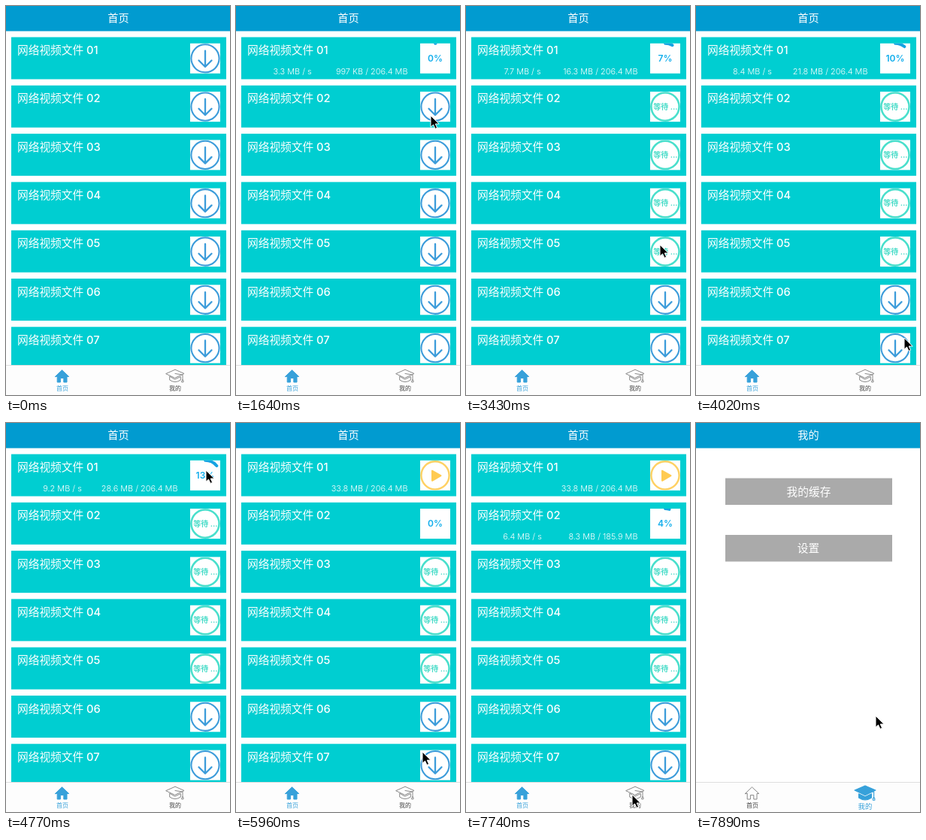
An HTML page that plays this animation: 298 by 518 pixels, repeating every 8 s.

```html
<!DOCTYPE html>
<html lang="zh-CN">
<head>
<meta charset="utf-8">
<title>首页</title>
<style>
  html, body { margin: 0; width: 100%; height: 100%; overflow: hidden; background: #fff; }
  #stage { display: block; width: 298px; height: 518px; }
  text { font-family: Inter, "Noto Sans CJK SC", "Noto Sans CJK", sans-serif; }
  .mid { text-anchor: middle; }
  .title { font-size: 14.7px; fill: #fff; }
  .head { font-size: 14.2px; font-weight: 500; fill: #fff; }
  .info { font-size: 10.9px; font-weight: 300; fill: #fff; }
  .wait { font-size: 10px; font-weight: 700; fill: #48dcc8; }
  .pct { font-size: 12px; font-weight: 600; fill: #12aeec; }
  .tab { font-size: 8px; fill: #444; }
  .line { fill: none; stroke-linecap: round; stroke-linejoin: round; }
  .on { color: #37a1da; }
  .on text { fill: #37a1da; }
  .off { color: #888; }
</style>
</head>
<body>
<svg id="stage" viewBox="0 0 298 518">
  <rect width="298" height="518" fill="#fff"/>
  <g id="list"></g>
  <g id="mine">
    <rect x="39" y="73.5" width="222" height="35.5" fill="#aaa"/>
    <rect x="39" y="149" width="222" height="35.5" fill="#aaa"/>
    <text class="title mid" x="150" y="97">我的缓存</text>
    <text class="title mid" x="149.5" y="172">设置</text>
  </g>
  <rect width="298" height="33.5" fill="#019bd0"/>
  <text id="head" class="head mid" x="149.5" y="21"></text>
  <rect y="478" width="298" height="40" fill="#fdfdfd"/>
  <rect y="478" width="298" height="1" fill="#dedede"/>
  <g id="home"></g>
  <g id="cap"></g>
  <path id="cursor" d="M0 0V15.2L3.5 12L6 17.4L8.6 16.2L6.2 11H11.2Z" fill="#000" stroke="#fff" stroke-width="1"/>
</svg>
<script>
const LOOP = 8000, ROWS = 7, PITCH = 64.3;
const $ = id => document.getElementById(id);

// Steps at which rows are tapped
const START = 2, PAUSE = 29, LEAVE = 46;
const QUEUED = [2, 5, 8, 12, 15];

// Keys: step, megabytes, speed
const downloads = [
  { total: 206.4, from: 3, keys: [[2, 0, 0], [4, .997, 3.3], [16, 16.3, 7.7], [25, 28.6, 9.2], [29, 33.8, 9.3]] },
  { total: 185.9, from: 37, keys: [[36, 0, 0], [37, .42, 2.8], [45, 8.3, 6.4]] }
];

// Keys: step, x, y
const path = [
  [0, 259, 66], [2, 259, 66], [4, 259, 146], [5, 259, 146], [7, 258, 204], [8, 258, 206],
  [9, 258, 240], [11, 258, 268], [12, 258, 268], [14, 258, 318], [17, 258, 318],
  [19, 268, 390], [21, 285, 494], [22, 284, 430], [24, 269, 100], [25, 266, 63],
  [29, 264, 66], [31, 260, 140], [32, 255, 250], [33, 248, 438], [34, 243, 452],
  [37, 243, 452], [42, 222, 492], [45, 221, 495], [46, 239, 390]
];

function sample(keys, n) {
  const i = keys.findIndex(k => k[0] >= n);
  if (i < 0) return keys[keys.length - 1].slice(1);
  if (i === 0) return keys[0].slice(1);
  const a = keys[i - 1], b = keys[i], u = (n - a[0]) / (b[0] - a[0]);
  return a.slice(1).map((v, j) => v + (b[j + 1] - v) * u);
}

const ring = (color, width) =>
  `<circle cx="20" cy="20" r="18.6" fill="none" stroke="${color}" stroke-width="${width}"/>`;

const icons = {
  idle: ring('#3c9cda', 2.1) +
    '<path class="line" d="M20 9.8V31M11.5 22.7L20 31.2L28.5 22.7" stroke="#3c9cda" stroke-width="2.3"/>',
  wait: ring('#4adfcc', 2.6) + '<text class="wait mid" x="20.5" y="23.7">等待 ...</text>',
  play: ring('#ffd164', 2.4) +
    '<path class="line" d="M16 13.8V27L27.5 20.4Z" style="fill:#ffcb52" stroke="#ffcb52" stroke-width="2"/>',
  load(part) {
    const arc = part > 0 ? `<circle class="line" cx="20" cy="20" r="20" pathLength="100"
      stroke="#16a3e2" stroke-width="4" stroke-dasharray="${part * 100} 100" transform="rotate(-90 20 20)"/>` : '';
    return arc + `<text class="pct mid" x="20" y="24.3">${Math.floor(part * 100)}%</text>`;
  }
};

const size = mb => mb < 1 ? Math.round(mb * 1000) + ' KB' : mb.toFixed(1) + ' MB';

function rowState(i, n) {
  if (i >= QUEUED.length || n < QUEUED[i]) return { icon: icons.idle };
  const active = i === 0 || (i === 1 && n >= PAUSE);
  if (!active) return { icon: icons.wait };
  const d = downloads[i], [mb, speed] = sample(d.keys, n);
  const paused = i === 0 && n >= PAUSE;
  return {
    icon: paused ? icons.play : icons.load(mb / d.total),
    speed: !paused && n >= d.from ? speed.toFixed(1) + ' MB / s' : '',
    size: n >= d.from ? `${size(mb)} / ${d.total} MB` : ''
  };
}

const rows = Array.from({ length: ROWS }, (_, i) => {
  const g = document.createElementNS('http://www.w3.org/2000/svg', 'g');
  g.setAttribute('transform', `translate(0 ${41.5 + i * PITCH})`);
  g.innerHTML = `<rect x="7" width="286" height="56" fill="#00ced1"/>
    <text class="title" x="15" y="22.5" font-weight="500">网络视频文件 0${i + 1}</text>
    <text class="info mid" x="75" y="49"></text>
    <text class="info" x="228.5" y="49" text-anchor="end"></text>
    <rect x="245" y="8.3" width="40" height="40" fill="#fff"/>
    <svg x="245" y="8.3" width="40" height="40"></svg>`;
  $('list').append(g);
  const [speed, total] = g.querySelectorAll('.info');
  return { speed, total, icon: g.querySelector('svg') };
});

function drawTabs(mine) {
  $('home').setAttribute('class', mine ? 'off' : 'on');
  $('home').innerHTML = `<path class="line" d="M65.5 493.5L74.5 484.8L83.7 493.5H81V501H76.8V495.5H72.4V501H68.2V493.5Z"
    style="fill:${mine ? 'none' : 'currentColor'}" stroke="currentColor" stroke-width="1"/>
    <text class="tab mid" x="75" y="511.6">首页</text>`;
  $('cap').setAttribute('class', mine ? 'on' : 'off');
  const fill = mine ? 'currentColor' : 'none';
  $('cap').innerHTML = `<g class="line" stroke="currentColor" stroke-width="1"
      transform="translate(225 492) scale(${mine ? 1.16 : 1})">
      <path d="M-12 -2.5L0 -7.8L12 -2.5L0 3.2Z" style="fill:${fill}"/>
      <path d="M-7.3 1.6V6Q0 11 7.3 6V1.6L0 5Z" style="fill:${fill}"/>
      <path d="M0 -2.5L10 -.8V6.5M9 7L10 5.5L11 7V8.8H9Z"/>
    </g>
    <text class="tab mid" x="225" y="${mine ? 514 : 511.6}" style="font-size:${mine ? 9.4 : 8}px">我的</text>`;
}

function draw(n) {
  const mine = n >= LEAVE;
  $('list').style.display = mine ? 'none' : '';
  $('mine').style.display = mine ? '' : 'none';
  $('head').textContent = mine ? '我的' : '首页';
  drawTabs(mine);
  rows.forEach((row, i) => {
    const s = rowState(i, n);
    row.icon.innerHTML = s.icon;
    row.speed.textContent = s.speed || '';
    row.total.textContent = s.size || '';
  });
  const [x, y] = sample(path, n);
  $('cursor').style.display = n < 0 ? 'none' : '';
  $('cursor').setAttribute('transform', `translate(${Math.round(x)} ${Math.round(y)})`);
}

// The screen refreshes about every 149 ms
const stepTime = n => Math.round((1045.2 + 148.8 * n) / 10) * 10;

function stepAt(t) {
  let n = -1;
  while (n < LEAVE && stepTime(n + 1) <= t) n++;
  return n;
}

let shown = null;
function tick() {
  const n = stepAt(performance.now() % LOOP);
  if (n !== shown) draw(shown = n);
  requestAnimationFrame(tick);
}
tick();
</script>
</body>
</html>
```
